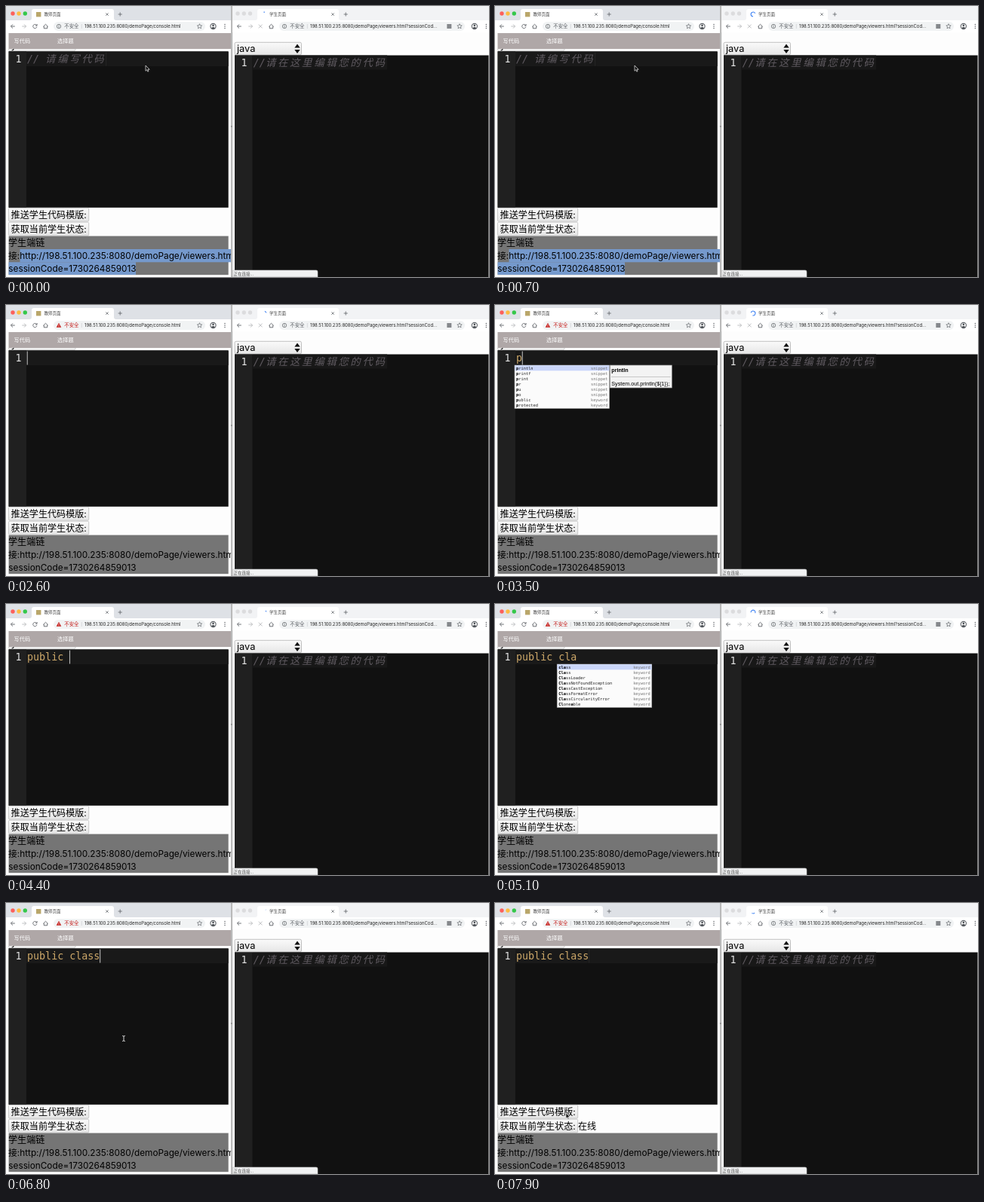
Animation of 640 by 360 pixels, one loop 8000 ms. Source, as an HTML page:

```html
<!DOCTYPE html>
<html lang="zh">
<head>
<meta charset="utf-8">
<style>
html, body { margin: 0; width: 100%; height: 100%; overflow: hidden; background: #fdfdfd; }
svg { display: block; width: 640px; height: 360px; }
text { white-space: pre; fill: #000; font-family: "Inter", "Noto Sans CJK SC", "Noto Sans CJK", sans-serif; }
.ui { font-size: 5.5px; fill: #444; }
.url { font-size: 5.95px; fill: #222; }
.safe { font-size: 6.4px; fill: #5f6368; }
.nav { font-size: 7.2px; fill: #fff; }
.big { font-size: 12.1px; }
.link { font-size: 11.8px; }
.mono, .mono tspan { font-family: "DejaVu Sans Mono", "Noto Sans CJK SC", "Noto Sans CJK", monospace; }
.code { font-size: 13.35px; fill: #cda869; }
.note { fill: #5f5a60; font-style: italic; }
.wide { letter-spacing: 2.72px; }
.num { font-size: 13.35px; fill: #e2e2e2; }
.item { font-size: 5.36px; fill: #222; }
.meta { font-size: 5.36px; fill: #777; text-anchor: end; }
.doc { font-size: 7.2px; font-family: "Liberation Sans", sans-serif; }
.line { fill: none; stroke: #5f6368; stroke-width: .9; }
.bold { font-weight: 700; }
</style>
</head>
<body>
<svg id="stage" viewBox="0 0 640 360">
  <defs>
    <clipPath id="leftClip"><rect width="298" height="360"/></clipPath>
    <linearGradient id="button" x2="0" y2="1">
      <stop stop-color="#fafafa"/><stop offset="1" stop-color="#e6e6e6"/>
    </linearGradient>
    <g id="nav">
      <path class="line" d="M11.8 27H6.5M9 24.4L6.4 27L9 29.6"/>
      <path class="line" d="M21.3 27h5.3M24 24.4L26.6 27L24 29.6" style="stroke:#b8babd"/>
    </g>
    <path id="home" class="line" d="M49.4 27.3L52.5 24.3L55.6 27.3M50.3 26.8v3h4.4v-3"/>
    <path id="bar" d="M100.3 24v6" stroke="#c4c6c9" stroke-width=".6"/>
    <path id="star" class="line" d="M256.5 23.7l.9 2.1 2.3.2-1.7 1.5.5 2.3-2-1.2-2 1.2.5-2.3-1.7-1.5 2.3-.2z" style="stroke-width:.7"/>
    <g id="menu">
      <circle class="line" cx="274.5" cy="27" r="3.6" style="stroke-width:1.1"/>
      <circle cx="274.5" cy="25.9" r="1.3" fill="#4c5055"/>
      <path d="M271.9 29.2q2.6-2.5 5.2 0q-2.6 1.9-5.2 0" fill="#4c5055"/>
      <g fill="#5f6368"><circle cx="290" cy="24.5" r=".75"/><circle cx="290" cy="27" r=".75"/><circle cx="290" cy="29.5" r=".75"/></g>
    </g>
    <path id="tabMarks" class="line" d="M132.3 9.4l3.4 3.4m0-3.4l-3.4 3.4M148.6 11h5.2M151.2 8.4v5.2" style="stroke-width:.8"/>
    <g id="info"><circle class="line" cx="70" cy="27" r="2.7" style="stroke-width:.7"/><path d="M70 26.5v2.1M70 25v.8" stroke="#5f6368" stroke-width=".8"/></g>
  </defs>

  <g clip-path="url(#leftClip)">
    <rect width="298" height="360" fill="#fdfdfd"/>
    <rect width="298" height="19" fill="#dee1e6"/>
    <path d="M31 19q3 0 3-3V7q0-3 3-3h103q3 0 3 3v9q0 3 3 3z" fill="#fff"/>
    <circle cx="9" cy="10" r="2.7" fill="#fc605b"/>
    <circle cx="17" cy="10" r="2.7" fill="#fdbc40"/>
    <circle cx="25.3" cy="10" r="2.7" fill="#34c84a"/>
    <rect x="40" y="8" width="6.4" height="6.4" fill="#b9a66a"/>
    <text class="ui" x="50.5" y="13">教师页面</text>
    <rect y="19" width="298" height="16" fill="#fff"/>
    <rect x="63" y="21" width="201" height="12" rx="6" fill="#f1f3f4"/>
    <use href="#nav"/><use href="#home"/><use href="#bar"/><use href="#star"/><use href="#menu"/><use href="#tabMarks"/>
    <path class="line" d="M40.6 25.7A2.6 2.6 0 1 0 40.9 27.6M41.1 24v2.1H39"/>
    <use id="infoMark" href="#info"/>
    <g id="warnMark"><path d="M70 23.7L73.3 29.7H66.7z" fill="#c5221f"/><path d="M70 25.8v1.8M70 28.2v.8" stroke="#fff" stroke-width=".7"/></g>
    <text id="safe" class="safe" x="77.3" y="29.3">不安全</text>
    <text class="url" x="104" y="29.1">198.51.100.235:8080/demoPage/console.html</text>

    <rect x="3.5" y="36" width="294.5" height="21" fill="#afa7a7"/>
    <text class="nav" x="10.5" y="49">写代码</text>
    <text class="nav" x="68" y="49">选择题</text>
    <path d="M3.5 57v1.2q0 1.5 2 1.5H90q2 0 2-1.5V57" fill="#eee" stroke="#bbb" stroke-width=".6"/>
    <path d="M10 57q0 1.8-2.4 1.8" stroke="#222" stroke-width="1.1" fill="none"/>
    <rect x="3.6" y="60.2" width="291.1" height="207.6" fill="#111"/>
    <rect x="3.6" y="60.2" width="23.4" height="207.6" fill="#202020"/>
    <rect x="27" y="61" width="267.7" height="19" fill="#191919"/>
    <text class="mono num" x="12.5" y="75.3">1</text>
    <text id="code" class="mono code" x="28" y="75.3"></text>
    <rect id="caret" y="61.5" width="1.1" height="18"/>

    <g fill="url(#button)" stroke="#b5b5b5" stroke-width=".7">
      <rect x="3.4" y="268.3" width="106.3" height="17.8" rx="1.5"/>
      <rect id="stateButton" x="3.4" y="287.2" width="106.3" height="17.8" rx="1.5"/>
    </g>
    <text class="big" x="6.6" y="282">推送学生代码模版:</text>
    <text class="big" x="6.6" y="300.6">获取当前学生状态:</text>
    <text class="big" id="online" x="110" y="300.6">在线</text>
    <rect x="3.6" y="305.6" width="291.1" height="51.6" fill="#757575"/>
    <g id="selection" fill="#7599cc"><rect x="18.5" y="323" width="280" height="17.3"/><rect x="3.6" y="340.3" width="168.4" height="16.7"/></g>
    <text class="big" x="3" y="318.6">学生端链</text>
    <text class="link" x="3" y="335.8">接:http://198.51.100.235:8080/demoPage/viewers.html?</text>
    <text class="link" x="3.3" y="352.7">sessionCode=1730264859013</text>
  </g>

  <rect x="298" width="2.5" height="360" fill="#b9b9b9"/>
  <circle cx="298.8" cy="160" r="1" fill="#888"/>

  <g>
    <rect x="300.5" width="340" height="360" fill="#fdfdfd"/>
    <rect x="300.5" width="340" height="19" fill="#f2f3f5"/>
    <path d="M330 19q3 0 3-3V7q0-3 3-3h102q3 0 3 3v9q0 3 3 3z" fill="#fff"/>
    <g fill="#dcdcde"><circle cx="307" cy="10" r="2.7"/><circle cx="315.3" cy="10" r="2.7"/><circle cx="323.5" cy="10" r="2.7"/></g>
    <path id="spinner" fill="none" stroke="#4285f4" stroke-width="1.1"/>
    <text class="ui" x="349" y="13">学生页面</text>
    <rect x="300.5" y="19" width="340" height="16" fill="#fff"/>
    <rect x="362" y="21" width="246" height="12" rx="6" fill="#f1f3f4"/>
    <use href="#nav" x="300"/><use href="#home" x="299"/><use href="#bar" x="299"/><use href="#star" x="344.5"/><use href="#menu" x="346.3"/><use href="#tabMarks" x="299"/>
    <path class="line" d="M334.8 24.6l4.8 4.8m0-4.8l-4.8 4.8" style="stroke:#b8babd"/>
    <use href="#info" x="299"/>
    <text class="safe" x="376.3" y="29.3">不安全</text>
    <text class="url" x="403" y="29.1">198.51.100.235:8080/demoPage/viewers.html?sessionCod...</text>
    <rect x="584.3" y="24" width="6" height="6" fill="#85888c"/>

    <rect x="303" y="48.3" width="88.5" height="16.7" rx="2" fill="url(#button)" stroke="#aaa" stroke-width=".7"/>
    <text x="306" y="61.2" style="font-size:12.8px">java</text>
    <path d="M382.3 55.6L386 50.6L389.7 55.6zM382.3 57.9L386 62.9L389.7 57.9z" fill="#111"/>
    <rect x="303" y="65.5" width="336.5" height="294.5" fill="#111"/>
    <rect x="303" y="65.5" width="23.5" height="294.5" fill="#202020"/>
    <rect x="326.5" y="65.5" width="178.5" height="19" fill="#181818"/>
    <text class="mono num" x="311.5" y="80">1</text>
    <text id="hint" class="mono code note" x="327.8" y="80"></text>
    <path d="M300.5 351H411q2 0 2 2V360H300.5z" fill="#f1f2f3" stroke="#b8b8b8" stroke-width=".6"/>
    <text class="ui" x="301.5" y="357.6">正在连接...</text>
  </g>
  <g id="popup"></g>
  <path id="arrow" d="M0 0V7.3L1.7 5.7L2.8 8.2L4 7.7L2.9 5.3H5.2z" fill="#111" stroke="#eee" stroke-width=".7"/>
  <path id="beam" d="M-1.8-3.6Q0-3.6 0-2.4Q0-3.6 1.8-3.6M0-2.6V2.6M-1.8 3.6Q0 3.6 0 2.4Q0 3.6 1.8 3.6" fill="none" stroke="#d8d8d8" stroke-width="1"/>
</svg>
<script>
const LOOP = 8000, CELL = 8.035, CODE_X = 28;
const CLICK = 1000, ERASE = 1900, CLOSE = 5800, BLUR = 7400;
const NOTE = "// 请编写代码";
const $ = id => document.getElementById(id);
const show = (id, on) => $(id).setAttribute("display", on ? "inline" : "none");
const set = (id, attrs) => Object.entries(attrs).forEach(([k, v]) => $(id).setAttribute(k, v));

const edits = [[0, NOTE]];
for (let i = 1; i <= NOTE.length; i++) edits.push([ERASE + (i - 1) * 100, NOTE.slice(0, -i)]);
edits.push([3100, "p"], [3600, "pu"], [3700, "pub"], [3800, "publ"], [3900, "publi"], [4000, "public"],
  [4200, "public "], [4500, "public c"], [4540, "public cl"], [4580, "public cla"],
  [5300, "public clas"], [5500, "public class"]);

const pointer = [[0, 185, 79], [6400, 185, 79], [6800, 156, 180], [7200, 92, 291], [7400, 90, 295], [7600, 90, 295], [7900, 94, 279], [LOOP, 94, 279]];
const words = {
  p: "println printf print pr pu po public protected".split(" "),
  c: "class Class ClassLoader ClassNotFoundException ClassCastException ClassFormatError ClassCircularityError Cloneable".split(" ")
};
const snippets = words.p.slice(0, 6);

const isWide = c => c > "\u2e80";
const cells = s => [...s].reduce((n, c) => n + (isWide(c) ? 2 : 1), 0);
const spaced = s => s.replace(/[\u2e80-\uffff]+/g, m => `<tspan class="wide">${m}</tspan>`);

// Marks typed letters in order; returns null when the word does not match.
function mark(word, typed) {
  let n = 0;
  const out = [...word].map(c => {
    if (n === typed.length || c.toLowerCase() !== typed[n]) return c;
    n++;
    return `<tspan class="bold" fill="#000">${c}</tspan>`;
  }).join("");
  return n === typed.length ? out : null;
}

function popupMarkup(code) {
  const typed = code.split(" ").pop();
  if (!typed || !words[typed[0]]) return "";
  const rows = words[typed[0]].filter(w => mark(w, typed));
  const x = CODE_X + (code.length - typed.length) * CELL - 2, y = 80, h = 7.12;
  let s = `<rect x="${x}" y="${y}" width="125.5" height="${rows.length * h + .4}" fill="#fbfbfb" stroke="#aaa" stroke-width=".6"/>
    <rect x="${x + .3}" y="${y + .2}" width="125" height="${h}" fill="#cad6fa"/>`;
  rows.forEach((w, i) => {
    const base = y + 5.6 + i * h;
    s += `<text class="mono item" x="${x + 2}" y="${base}">${mark(w, typed)}</text>
      <text class="mono meta" x="${x + 123.5}" y="${base}">${snippets.includes(w) ? "snippet" : "keyword"}</text>`;
  });
  if (rows[0] === "println") {
    s += `<rect x="${x + 126.3}" y="80" width="82" height="30" fill="#f3f3f3" stroke="#999" stroke-width=".7"/>
      <path d="M${x + 128} 95.5h78.5" stroke="#aaa" stroke-width=".6"/>
      <text class="doc bold" x="${x + 128.3}" y="89">println</text>
      <text class="doc" x="${x + 128.3}" y="106.5">System.out.println(\${1});</text>`;
  }
  return s;
}

function pointerAt(t) {
  const i = pointer.findIndex(p => p[0] > t);
  const a = pointer[i - 1], b = pointer[i];
  const k = (t - a[0]) / (b[0] - a[0]), e = k * k * (3 - 2 * k);
  return [a[1] + (b[1] - a[1]) * e, a[2] + (b[2] - a[2]) * e];
}

// cubic-bezier(.4, 0, .2, 1)
function ease(p) {
  let lo = 0, hi = 1;
  for (let i = 0; i < 20; i++) {
    const u = (lo + hi) / 2, v = 1 - u;
    if (1.2 * v * v * u + .6 * v * u * u + u ** 3 < p) lo = u; else hi = u;
  }
  return 3 * (1 - lo) * lo * lo + lo ** 3;
}

function spinnerPath(t) {
  const time = t + 397, arc = 666.5, turn = Math.floor(time / arc);
  let sweep = 270 * ease(time % arc / arc);
  sweep = turn % 2 ? Math.max(sweep, 5) : Math.min(sweep - 270, -5);
  const start = 200 + 360 * time / 1568 + Math.floor(turn / 2) % 4 * 270;
  const at = deg => `${342 + 2.9 * Math.cos(deg * Math.PI / 180)} ${11 + 2.9 * Math.sin(deg * Math.PI / 180)}`;
  return `M${at(start)}A2.9 2.9 0 ${Math.abs(sweep) > 180 ? 1 : 0} ${sweep > 0 ? 1 : 0} ${at(start + sweep)}`;
}

function draw(t) {
  const [since, code] = edits.filter(e => e[0] <= t).pop();
  $("code").innerHTML = spaced(code);
  $("code").classList.toggle("note", code.startsWith("/"));

  const focused = t >= CLICK && t < BLUR;
  const blink = (t - Math.max(since, CLICK)) % 1000 < 500;
  set("caret", { x: CODE_X + cells(code) * CELL - .3, fill: focused ? "#b5b5b5" : "#262626" });
  show("caret", !focused || blink);
  $("popup").innerHTML = t < CLOSE && !code.startsWith("/") ? popupMarkup(code) : "";

  const edited = t >= ERASE;
  show("infoMark", !edited);
  show("warnMark", edited);
  $("safe").style.fill = edited ? "#c5221f" : "#5f6368";
  show("selection", t < CLICK);
  show("online", t >= 7500);
  set("stateButton", { fill: t >= BLUR && t < 7500 ? "#cfcfcf" : "url(#button)" });

  const [x, y] = pointerAt(t);
  const visible = t < ERASE || t >= 6400;
  const isArrow = t < CLICK || y > 267;
  show("arrow", visible && isArrow);
  show("beam", visible && !isArrow);
  set(isArrow ? "arrow" : "beam", { transform: `translate(${x} ${y})` });
  set("spinner", { d: spinnerPath(t) });
}

$("hint").innerHTML = spaced("//请在这里编辑您的代码");

function frame() {
  draw(Math.floor(performance.now() % LOOP / 100) * 100);
  requestAnimationFrame(frame);
}
frame();
</script>
</body>
</html>
```
